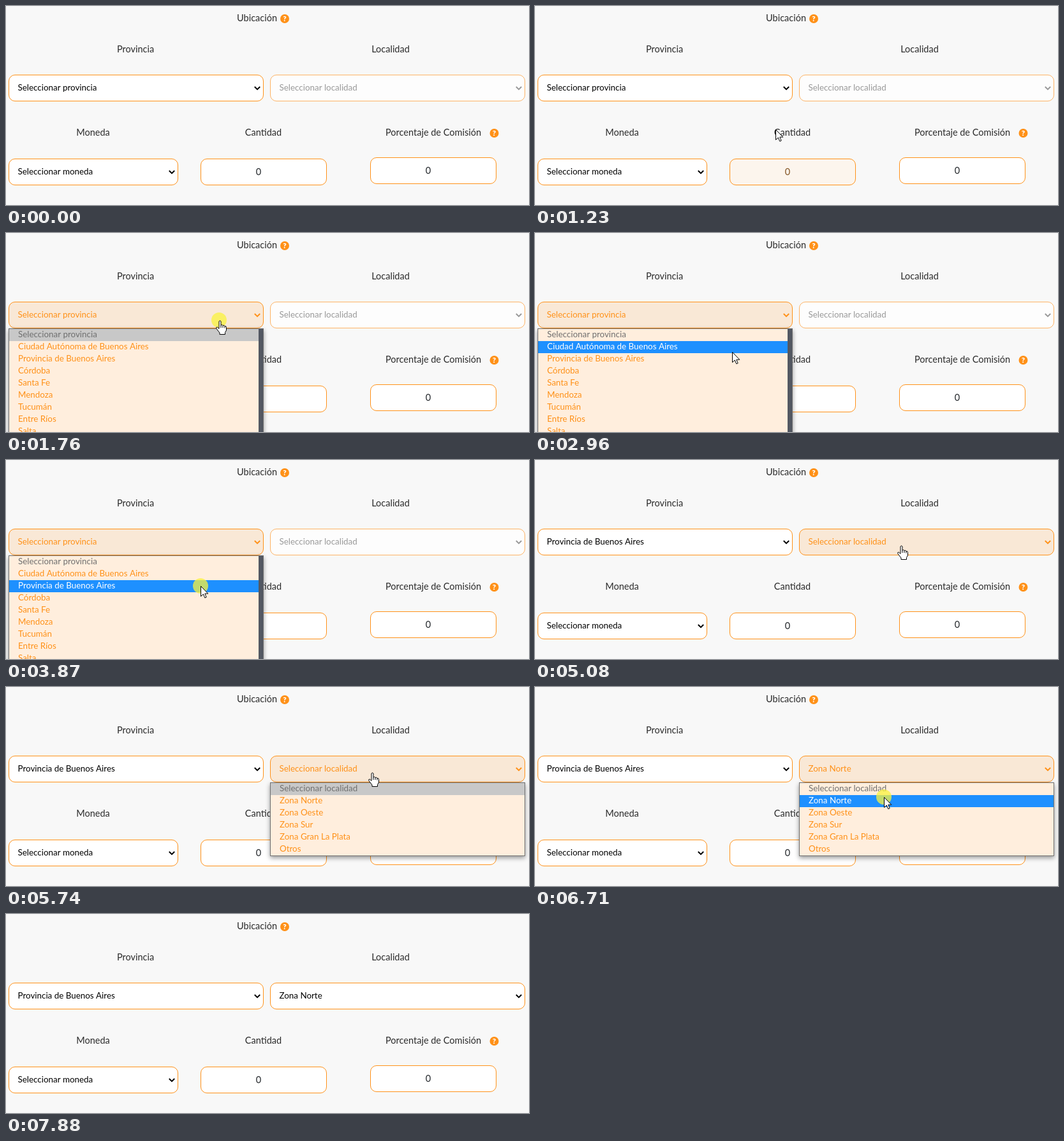
An HTML page with a canvas that plays this animation: 820x313 px, repeating every 9.7 s.

```html
<!DOCTYPE html>
<html lang="es">
<head>
<meta charset="utf-8">
<style>
html, body { margin: 0; width: 100%; height: 100%; overflow: hidden; background: #f8f8f8; }
canvas { display: block; }
</style>
</head>
<body>
<canvas id="stage" width="820" height="313"></canvas>
<script>
const ctx = document.getElementById('stage').getContext('2d');
const LOOP = 9700;
const ORANGE = [255, 145, 24], BLACK = [0, 0, 0], WHITE = [255, 255, 255], PEACH = [249, 232, 214];
const FONT = 'Lato, "Open Sans", sans-serif';
const provinces = ['Seleccionar provincia', 'Ciudad Autónoma de Buenos Aires', 'Provincia de Buenos Aires',
  'Córdoba', 'Santa Fe', 'Mendoza', 'Tucumán', 'Entre Ríos', 'Salta'];
const places = ['Seleccionar localidad', 'Zona Norte', 'Zona Oeste', 'Zona Sur', 'Zona Gran La Plata', 'Otros'];

// Pointer moves: start, end, then start point, control point and end point of a curve
const moves = [
  [870, 1500, 410, 313, 400, 200, 334, 137],
  [2210, 2660, 334, 137, 322, 150, 314, 176],
  [2860, 3150, 314, 176, 303, 199, 305, 198],
  [4200, 4840, 305, 198, 394, 152, 538, 137],
  [4870, 5080, 538, 137, 560, 138, 573, 134],
  [5740, 6070, 573, 134, 562, 146, 547, 173],
  [7670, 7880, 547, 173, 532, 220, 553, 281]
];
const clicks = [[1730, 1920], [3870, 4060], [5340, 5510], [6610, 6800]];

const arrow = new Path2D('M.5 .5V16.5L4.3 13L6.8 18.8L9.2 17.8L6.8 12.2H11.8Z');
const hand = new Path2D('M0 2Q1.5 -.5 3 2V8Q5.2 6.3 6 8.5Q8.2 7.2 9 9.7Q11.3 8.7 11.5 11.5V16L9.5 19.5V22.5H1V20L-4 13.5Q-5 10.8 -2.7 11L0 13.5Z');
const knuckles = new Path2D('M3 8V12M6 8.5V12M9 9.7V12.5');
const beam = new Path2D('M-3 -8H3M0 -8V8M-3 8H3');

const clamp = v => Math.max(0, Math.min(1, v));
const within = (t, from, to) => t >= from && t < to;
const rgb = c => `rgb(${c})`;
const mix = (a, b, k) => rgb(a.map((v, i) => Math.round(v + (b[i] - v) * k)));
const hover = (t, on, off) => clamp((t - on) / 150) - clamp((t - off) / 180);

function text(str, x, y, color = '#212529', size = 13.4, align = 'left', weight = 400) {
  ctx.font = `${weight} ${size}px ${FONT}`;
  ctx.textAlign = align;
  ctx.fillStyle = color;
  ctx.fillText(str, x, y);
}

const label = (str, x, y) => text(str, x, y, '#2b2b2b', 14.5, 'center');

function help(x, y) {
  ctx.fillStyle = rgb(ORANGE);
  ctx.beginPath();
  ctx.arc(x, y, 7, 0, 7);
  ctx.fill();
  text('?', x, y + 4, '#fff', 11.5, 'center', 900);
}

function box(x, y, w, glow = 0, disabled = false) {
  ctx.beginPath();
  ctx.roundRect(x + .5, y + .5, w - 1, 41, 9.5);
  ctx.fillStyle = disabled ? '#fdfdfd' : mix(WHITE, PEACH, glow);
  ctx.fill();
  ctx.lineWidth = 1;
  ctx.strokeStyle = disabled ? '#fdb365' : rgb(ORANGE);
  ctx.stroke();
}

function select(x, y, w, str, glow = 0, disabled = false) {
  const color = disabled ? '#999' : mix(BLACK, ORANGE, glow);
  box(x, y, w, glow, disabled);
  text(str, x + 14.5, y + 25, color);
  const cx = x + w - 10, cy = y + 19;
  ctx.beginPath();
  ctx.moveTo(cx - 4.2, cy);
  ctx.lineTo(cx, cy + 4.2);
  ctx.lineTo(cx + 4.2, cy);
  ctx.lineWidth = 2;
  ctx.strokeStyle = color;
  ctx.stroke();
}

function input(x, y, glow = 0) {
  box(x, y, 198, glow);
  text('0', x + 91, y + 26, mix([33, 37, 41], ORANGE, glow), 14.5, 'center');
}

function dropdown(x, items, bottom, scrollbar, pointerY) {
  const top = 150, row = 19, active = Math.max(0, Math.floor((pointerY - top - 1) / row));
  ctx.save();
  ctx.shadowColor = 'rgba(0,0,0,.4)';
  ctx.shadowBlur = 7;
  ctx.shadowOffsetY = 3;
  ctx.fillStyle = '#6f6f6f';
  ctx.fillRect(x, top, 400, bottom - top);
  ctx.restore();
  ctx.fillStyle = '#ffeedd';
  ctx.fillRect(x + 1, top + 1, 398, bottom - top - 2);
  ctx.fillStyle = active ? '#1e90ff' : '#c8c8c8';
  ctx.fillRect(x + 1, top + 1 + active * row, 398, row);
  items.forEach((item, i) => {
    const color = i === 0 ? '#6f6f6f' : i === active ? '#fff' : rgb(ORANGE);
    text(item, x + 15, top + 14 + i * row, color);
  });
  if (scrollbar) {
    ctx.fillStyle = '#535862';
    ctx.fillRect(x + 392, top + 1, 7, bottom - top);
  }
}

function pointerAt(t) {
  const [from, to, x0, y0, x1, y1, x2, y2] = moves.filter(m => m[0] <= t).pop() || moves[0];
  const u = clamp((t - from) / (to - from)), s = u * u * (3 - 2 * u);
  const curve = (a, b, c) => (1 - s) ** 2 * a + 2 * s * (1 - s) * b + s * s * c;
  return [Math.round(curve(x0, x1, x2)), Math.round(curve(y0, y1, y2))];
}

function drawPointer(t, x, y) {
  ctx.save();
  ctx.translate(x, y);
  if (clicks.some(c => within(t, ...c))) {
    ctx.fillStyle = 'rgba(249,243,60,.75)';
    ctx.beginPath();
    ctx.arc(0, 0, 12, 0, 7);
    ctx.fill();
  }
  ctx.lineWidth = 1;
  ctx.strokeStyle = '#000';
  ctx.fillStyle = '#fff';
  const overSelect = y > 107 && y < 150 && (x < 404 || x > 413);
  const overInput = y > 239 && y < 282 && x > 304 && x < 503;
  if (overInput) {
    ctx.stroke(beam);
  } else {
    const shape = overSelect ? hand : arrow;
    ctx.fill(shape);
    ctx.stroke(shape);
    if (overSelect) ctx.stroke(knuckles);
  }
  ctx.restore();
}

function draw(t) {
  const [px, py] = pointerAt(t);
  ctx.fillStyle = '#f8f8f8';
  ctx.fillRect(0, 0, 820, 313);

  label('Ubicación', 393.5, 24);
  label('Provincia', 203, 73);
  label('Localidad', 603, 73);
  label('Moneda', 136.5, 204);
  label('Cantidad', 403.5, 204);
  label('Porcentaje de Comisión', 670, 204);
  help(437, 20);
  help(765.5, 200);

  select(4, 108, 400, provinces[t < 3930 ? 0 : 2], hover(t, 1350, 4000));
  select(414, 108, 400, places[t < 6680 ? 0 : 1], hover(t, 4610, 6740), t < 3930);
  select(4, 240, 266, 'Seleccionar moneda');
  input(305, 240, hover(t, 1016, 1130));
  input(571, 238);

  if (within(t, 1745, 4000)) dropdown(4, provinces, 330, true, py);
  if (within(t, 5340, 6740)) dropdown(414, places, 266, false, py);
  if (within(t, 870, 7880)) drawPointer(t, px, py);
}

const start = performance.now();
function tick() {
  draw((performance.now() - start) % LOOP);
  requestAnimationFrame(tick);
}
tick();
</script>
</body>
</html>
```
